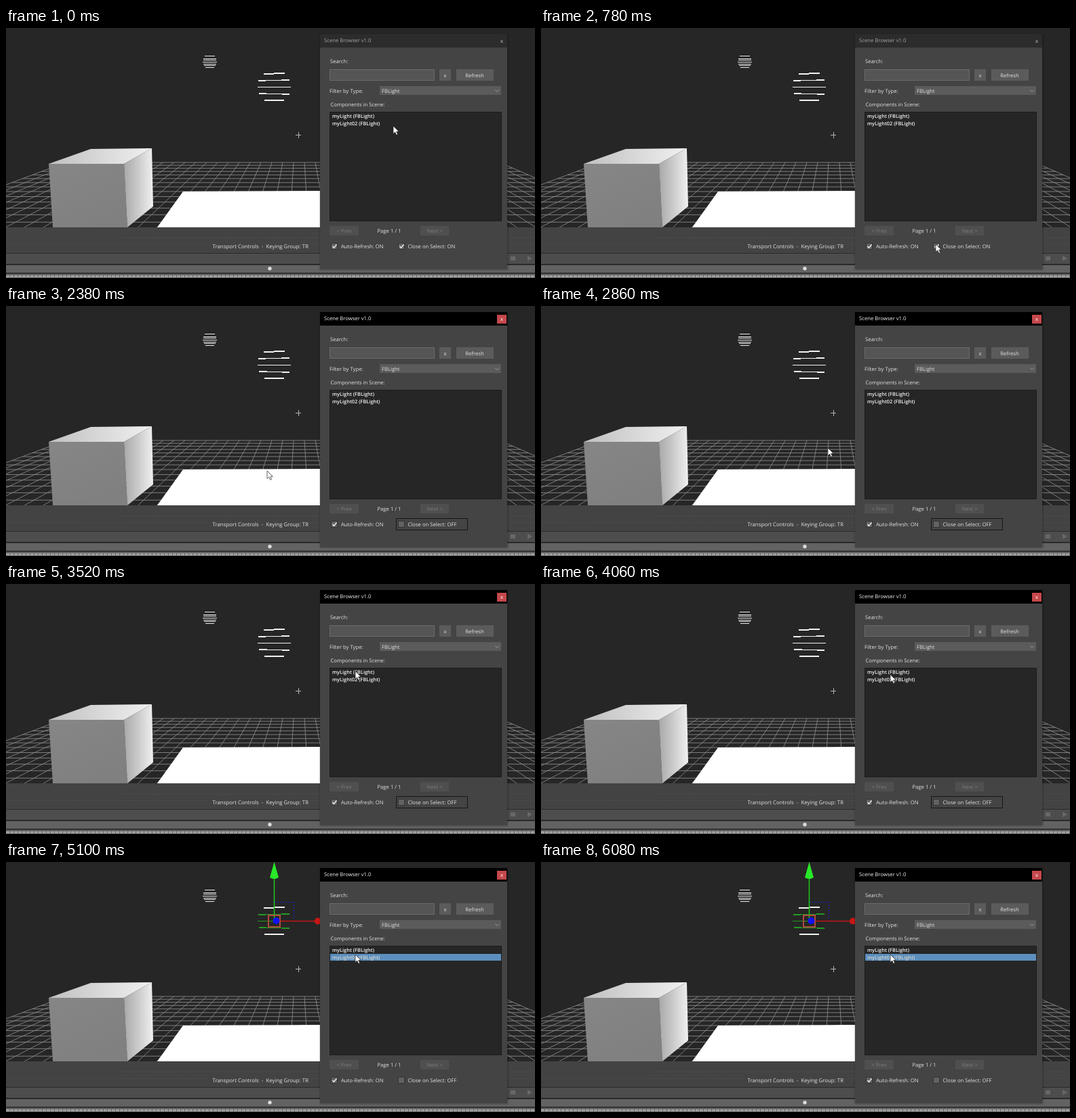
Recreate the animation shown at these times as an HTML page. Size 780 by 370 pixels, loop 6120 ms.

```html
<!DOCTYPE html>
<html lang="en">
<head>
<meta charset="utf-8">
<title>Scene Browser</title>
<style>
html, body { margin: 0; width: 100%; height: 100%; overflow: hidden; background: #262626; }
svg { display: block; }
text { font: 500 7.7px "Open Sans", "Noto Sans", sans-serif; fill: #e2e2e2; text-rendering: geometricPrecision; white-space: pre; }
.item { font-size: 7.4px; font-weight: 600; fill: #f2f2f2; }
.mid { text-anchor: middle; }
.dim { fill: #7c7c7c; }
.crisp, rect { shape-rendering: crispEdges; }
.btn { fill: #5b5b5b; }
.off { fill: #4f4f4f; }
.box { fill: #626262; stroke: #333; }
.tick { fill: none; stroke: #f0f0f0; stroke-width: 1.4; }
</style>
</head>
<body>
<svg width="780" height="370" viewBox="0 0 780 370">
  <defs>
    <linearGradient id="front" x2=".5" y2="1"><stop stop-color="#868686"/><stop offset="1" stop-color="#808080"/></linearGradient>
    <linearGradient id="top"><stop stop-color="#c0c0c0"/><stop offset="1" stop-color="#f0f0f0"/></linearGradient>
    <linearGradient id="side"><stop stop-color="#a8a8a8"/><stop offset="1" stop-color="#f0f0f0"/></linearGradient>
    <filter id="shade" x="-5%" y="-5%" width="110%" height="110%"><feGaussianBlur stdDeviation="1.5"/></filter>
    <clipPath id="view"><rect width="780" height="295"/></clipPath>
  </defs>

  <!-- viewport -->
  <rect width="780" height="370" fill="#262626"/>
  <g clip-path="url(#view)">
    <path id="grid" fill="none" stroke="#868686" stroke-width=".9"/>
    <path d="M261 242L463 241V295H223Z" fill="#fff"/>
    <path d="M63 201H174L179 295H69Z" fill="url(#front)"/>
    <path d="M63 201L125 179L215 178L174 201Z" fill="url(#top)"/>
    <path d="M174 201L215 178L217 264L179 295Z" fill="url(#side)"/>
  </g>
  <path d="M427 158.500h8M431.500 154v9" class="crisp" stroke="#b5b5b5"/>
  <path class="crisp" stroke="#e8e8e8" d="M293 41.500h15M291 45.500h19M291 47.500h19M290 50.500h21M291 53.500h19M292 55.500h17M294 58.500h13"/>
  <path class="crisp" stroke="#f2f2f2" stroke-width="2" d="M380 68L411 67M381 107h29"/>
  <path id="rings" class="crisp" stroke="#f2f2f2" stroke-width="1.500" d="M372 78L418 77M371 87.500h49M373 97L418 98"/>
  <g id="gizmo">
    <path d="M396 59H424V84" class="crisp" fill="none" stroke="#1c1cd8" stroke-dasharray="2 2"/>
    <path d="M395.500 22V87" stroke="#1fc81f" stroke-width="1.500"/>
    <path d="M395.500 0L402 23Q395.500 27 389 23Z" fill="#28e828"/>
    <path d="M398 87.500H459" stroke="#c01414" stroke-width="1.500"/>
    <circle cx="460" cy="87.500" r="5" fill="#c81616"/>
    <rect x="387" y="79" width="17" height="17" fill="none" stroke="#b04a3c" stroke-width="2"/>
    <circle cx="398.500" cy="87" r="5" fill="#1212f4"/>
  </g>

  <!-- transport area -->
  <rect y="295" width="780" height="39" fill="#434343"/>
  <path class="crisp" stroke="#2a2a2a" d="M0 333.500H780"/>
  <path class="crisp" stroke="#545454" stroke-dasharray="1 2" d="M165 310.500H780M0 320.500H300M450 320.500H780"/>
  <text x="304.500" y="325.500" style="font-size:7.850px">Transport Controls  -  Keying Group: TR</text>
  <rect y="334" width="780" height="15" fill="#4d4d4d"/>
  <rect x="744" y="338" width="7" height="6" fill="#686868"/>
  <path d="M769 337L776 341L769 345Z" fill="#686868"/>
  <rect y="349" width="780" height="2" fill="#2a2a2a"/>
  <rect y="351" width="780" height="11" fill="#626262"/>
  <circle cx="389" cy="356" r="2.700" fill="#ddd"/>
  <rect y="362" width="780" height="2" fill="#303030"/>
  <rect y="364" width="780" height="6" fill="#666"/>
  <path class="crisp" stroke="#a0a0a0" stroke-width="3" stroke-dasharray="5 1" d="M0 367.500H780"/>

  <!-- browser window -->
  <rect x="463" y="10" width="277" height="348" fill="#000" opacity=".3" filter="url(#shade)"/>
  <rect x="463" y="9" width="276" height="348" fill="#444"/>
  <rect id="bar" x="463" y="9" width="276" height="20"/>
  <rect id="close" x="724" y="13" width="14" height="13" fill="#c5484c"/>
  <text id="title" x="469" y="21">Scene Browser v1.0</text>
  <text id="cross" class="mid" x="731" y="22">x</text>

  <text x="478" y="52">Search:</text>
  <rect x="477.500" y="61.500" width="154" height="16" fill="#555" stroke="#6a6a6a"/>
  <rect class="btn" x="639" y="61" width="17" height="17"/>
  <text class="mid" x="647.500" y="73">x</text>
  <rect class="btn" x="664" y="61" width="55" height="17"/>
  <text class="mid" x="691" y="73">Refresh</text>
  <text x="477" y="96">Filter by Type:</text>
  <rect class="btn" x="551" y="86" width="179" height="13"/>
  <text x="554" y="96">FBLight</text>
  <path d="M721 91.500L724 94.500L727 91.500" fill="none" stroke="#999"/>
  <text x="478.500" y="116">Components in Scene:</text>
  <rect x="477.500" y="124.500" width="253" height="161" fill="#262626" stroke="#1c1c1c"/>
  <rect id="row" x="478" y="136" width="252" height="10" fill="#5b8fbe"/>
  <text class="item" x="481" y="133">myLight (FBLight)</text>
  <text class="item" id="second" x="481" y="143.500">myLight02 (FBLight)</text>

  <rect class="off" x="477" y="293" width="43" height="14"/>
  <text class="mid dim" x="498.500" y="303">&lt; Prev</text>
  <text class="mid" x="565" y="303">Page 1 / 1</text>
  <rect class="off" x="611" y="293" width="42" height="14"/>
  <text class="mid dim" x="632" y="303">Next &gt;</text>

  <rect class="box" x="479.500" y="318.500" width="9" height="9"/>
  <path class="tick" d="M481.500 323l2 2.500l4-5"/>
  <text x="494" y="326">Auto-Refresh: ON</text>
  <rect id="focus" x="575.500" y="314.500" width="105" height="17" fill="none" stroke="#161616"/>
  <rect class="box" x="578.500" y="318.500" width="9" height="9"/>
  <path id="check" class="tick" d="M580.500 323l2 2.500l4-5"/>
  <text id="option" x="592.500" y="326"></text>

  <path id="cursor" d="M0 0V11.500L2.700 9L4.600 13.300L6.600 12.400L4.700 8.300H8.300Z" fill="#fff" stroke="#222" stroke-width=".7"/>
</svg>
<script>
const LOOP = 6120, PRESS = 1000, TOGGLE = 1100, BLUR = 4340, SELECT = 4700;
const $ = id => document.getElementById(id);
const show = (id, on) => $(id).setAttribute("visibility", on ? "visible" : "hidden");
const fill = (id, color) => { $(id).style.fill = color; };

// Floor grid in perspective, converging at (432, 70)
function floorGrid() {
  const vx = 432, vy = 70, depth = 32, cell = 16, left = -21.5, cols = 40, rows = 15;
  const point = (col, row) => {
    const k = depth / (depth - row);
    return `${(vx + (left + col) * cell * k).toFixed(1)} ${(vy + 129 * k).toFixed(1)}`;
  };
  let d = "";
  for (let c = 0; c <= cols; c++) d += `M${point(c, 0)}L${point(c, rows)}`;
  for (let r = 0; r <= rows; r++) d += `M${point(0, r)}L${point(cols, r)}`;
  return d;
}

// Pointer stops: time, x, y
const path = [
  [0, 571, 145], [100, 571, 145], [700, 582, 320], [1880, 582, 320],
  [2340, 385, 244], [2560, 385, 244], [3400, 515, 129], [3780, 515, 129],
  [4250, 515, 137], [LOOP, 515, 137]
];

function pointer(t) {
  const i = path.findIndex(p => p[0] > t);
  const [t0, x0, y0] = path[i - 1], [t1, x1, y1] = path[i];
  const u = (t - t0) / (t1 - t0), e = u * u * (3 - 2 * u);
  return [x0 + (x1 - x0) * e, y0 + (y1 - y0) * e].map(Math.round);
}

function draw(now) {
  const t = now % LOOP;
  const active = t >= PRESS, off = t >= TOGGLE, selected = t >= SELECT;
  fill("bar", active ? "#000" : "#2c2c2c");
  fill("title", active ? "#f4f4f4" : "#a4a4a4");
  fill("cross", active ? "#fff" : "#c8c8c8");
  fill("second", selected ? "#d8d4cc" : "");
  show("close", active);
  show("focus", active && t < BLUR);
  show("check", !off);
  $("option").textContent = "Close on Select: " + (off ? "OFF" : "ON");
  show("row", selected);
  show("gizmo", selected);
  $("rings").style.stroke = selected ? "#239a23" : "";
  $("cursor").setAttribute("transform", `translate(${pointer(t)})`);
  requestAnimationFrame(draw);
}

$("grid").setAttribute("d", floorGrid());
draw(performance.now());
</script>
</body>
</html>
```
